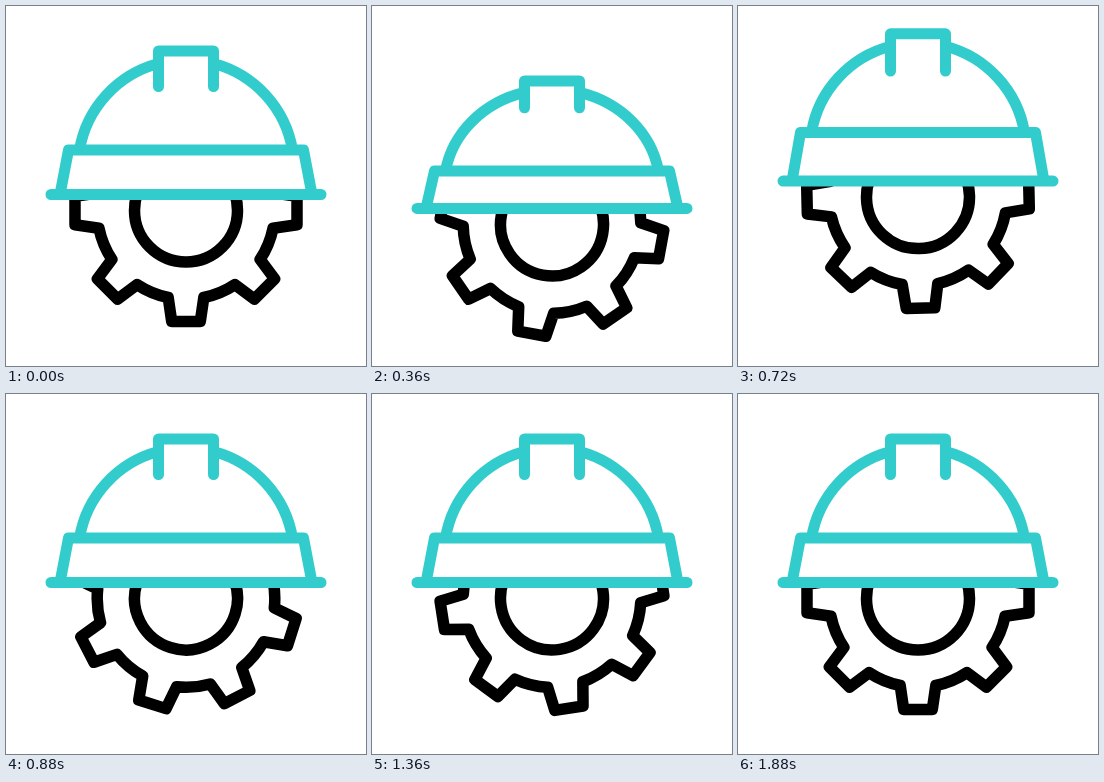
Recreate the animation shown at these times as an HTML page. Size 360 by 360 pixels, loop 2 s.

```html
<!DOCTYPE html>
<html lang="en">
<head>
<meta charset="utf-8">
<title>Helmet and gear</title>
<style>
  html, body { margin: 0; width: 100%; height: 100%; overflow: hidden; background: #fff; }
  svg { display: block; width: 100vw; height: 100vh; }
  .line { fill: none; stroke-linecap: round; stroke-linejoin: round; }
  .gear { stroke: #000; stroke-width: 11.5; }
  .helmet { stroke: #33cccc; stroke-width: 11; }
</style>
</head>
<body>
<svg viewBox="0 0 360 360">
  <defs>
    <clipPath id="below"><rect id="mask" width="360" height="360"/></clipPath>
  </defs>
  <g clip-path="url(#below)">
    <g id="wheel">
      <circle class="line gear" r="51.5"/>
      <path id="teeth" class="line gear"/>
    </g>
  </g>
  <path id="helmet" class="line helmet"/>
</svg>
<script>
const LOOP = 2000, TICK = 40;
const CENTER_X = 180, GEAR_DROP = 16;
const $ = id => document.getElementById(id);

// Heights of the helmet parts: rest, squashed, leaping, rest
const TIMES = [80, 320, 600, 880];
const HEIGHTS = {
  top:  [45, 78.4, 16.6, 45],
  vent: [80.5, 104.5, 55, 80.5],
  rim:  [144, 167.9, 115.1, 144],
  brim: [188.5, 204.6, 166.4, 188.5]
};

const clamp = v => Math.min(1, Math.max(0, v));
const smooth = u => u * u * (3 - 2 * u);

// Cubic bezier easing with handles (a, 0) and (b, 1)
function ease(x, a, b) {
  let lo = 0, hi = 1;
  for (let i = 0; i < 30; i++) {
    const s = (lo + hi) / 2, r = 1 - s;
    if (3 * r * r * s * a + 3 * r * s * s * b + s * s * s < x) lo = s;
    else hi = s;
  }
  return smooth((lo + hi) / 2);
}

function keyed(values, t) {
  let v = values[0];
  for (let i = 1; i < TIMES.length; i++) {
    const u = clamp((t - TIMES[i - 1]) / (TIMES[i] - TIMES[i - 1]));
    v += (values[i] - values[i - 1]) * smooth(u);
  }
  return v;
}

function gearPath() {
  const profile = [[87, -17.8], [111, -14.3], [111, 14.3], [87, 17.8]];
  let d = "";
  for (let n = 0; n < 8; n++) {
    const c = Math.cos(n * Math.PI / 4), s = Math.sin(n * Math.PI / 4);
    profile.forEach(([x, y], i) => {
      const step = i ? "L" : n ? "A88.8 88.8 0 0 1 " : "M";
      d += step + (x * c - y * s).toFixed(2) + " " + (x * s + y * c).toFixed(2);
    });
  }
  return d + "A88.8 88.8 0 0 1 87 -17.8Z";
}

function helmetPath({ top, vent, rim, brim }) {
  const k = (rim - top) / 99;
  const shoulder = rim - 86.5 * k;
  const arc = `A108 ${108 * k} 0 0 1 `;
  return `M45 ${brim}H315` +
    `M54 ${brim}L62.5 ${rim}H297.5L306 ${brim}` +
    `M73.5 ${rim}${arc}152.5 ${shoulder}` +
    `M207.5 ${shoulder}${arc}286.5 ${rim}` +
    `M152.5 ${vent}V${top}H207.5V${vent}`;
}

function draw(now) {
  const t = Math.floor((now % LOOP) / TICK) * TICK;
  const pose = {};
  for (const part in HEIGHTS) pose[part] = keyed(HEIGHTS[part], t);
  const angle = 180 * ease(clamp((t - 80) / 1800), 0.333, 0.833);
  $("helmet").setAttribute("d", helmetPath(pose));
  $("mask").setAttribute("y", pose.brim);
  $("wheel").setAttribute("transform",
    `translate(${CENTER_X} ${pose.brim + GEAR_DROP}) rotate(${angle})`);
}

$("teeth").setAttribute("d", gearPath());
const start = performance.now();
function frame() {
  draw(performance.now() - start);
  requestAnimationFrame(frame);
}
frame();
</script>
</body>
</html>
```
